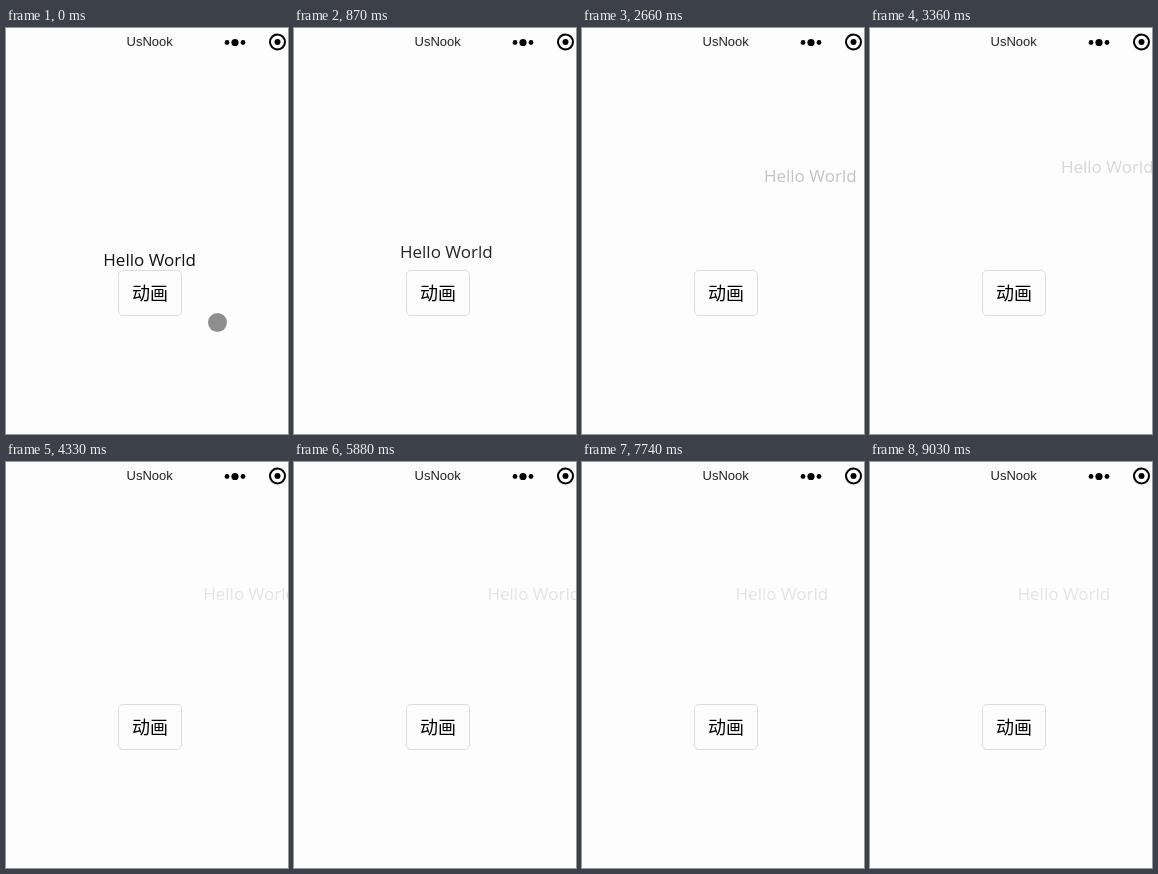
These frames come from a looping animation (282 px wide and 406 px high, 9130 ms). An HTML page:

```html
<!DOCTYPE html>
<html lang="zh-CN">
<head>
<meta charset="utf-8">
<title>Animation demo</title>
<style>
  html, body { margin: 0; width: 100%; height: 100%; overflow: hidden; background: #fdfdfd; }
  svg { display: block; width: 282px; height: 406px; }
  .title { font: 13px "Liberation Sans", Arial, sans-serif; fill: #222; }
  .label { font: 300 18px "Noto Sans CJK SC", "Noto Sans CJK", sans-serif; }
  .hello { font: 17px "Open Sans", "Noto Sans", sans-serif; fill: #111; }
</style>
</head>
<body>
<svg viewBox="0 0 282 406">
  <rect width="282" height="406" fill="#fdfdfd"/>
  <text class="title" x="143.7" y="18" text-anchor="middle">UsNook</text>
  <circle cx="221" cy="14.5" r="2.4"/>
  <circle cx="229" cy="14.5" r="3.6"/>
  <circle cx="237" cy="14.5" r="2.4"/>
  <circle cx="271.5" cy="14" r="7.5" fill="none" stroke="#000" stroke-width="2"/>
  <circle cx="271.5" cy="14" r="3"/>
  <rect x="112.5" y="242.5" width="63" height="45" rx="4.5" fill="#fdfdfd" stroke="#dcdcdc"/>
  <text class="label" x="144" y="272" text-anchor="middle">动画</text>
  <text class="hello" id="hello" x="97.3" y="238.3">Hello World</text>
  <circle id="touch" r="9.5" fill="#8e8e8e"/>
</svg>
<script>
const LOOP = 9130;
const DURATION = 4000;
const RISE_START = 467;
const SLIDE_START = 5400;
const FINAL_OPACITY = 0.1;

// Bursts of evenly spaced redraws: [first, last, count]
const BURSTS = [
  [560, 1560, 8], [1720, 2660, 8], [2810, 3780, 8], [3900, 4330, 4],
  [5480, 6430, 8], [6570, 7590, 9], [7740, 8760, 8], [9030, 9030, 1]
];

const hello = document.getElementById("hello");
const touch = document.getElementById("touch");

function bezier(a, b, s) {
  const r = 1 - s;
  return 3 * r * r * s * a + 3 * r * s * s * b + s * s * s;
}

// CSS "ease": cubic-bezier(.25, .1, .25, 1)
function ease(x) {
  if (x <= 0) return 0;
  if (x >= 1) return 1;
  let lo = 0, hi = 1;
  for (let i = 0; i < 24; i++) {
    const mid = (lo + hi) / 2;
    if (bezier(0.25, 0.25, mid) < x) lo = mid; else hi = mid;
  }
  return bezier(0.1, 1, lo);
}

function lastRedraw(time) {
  let result = 0;
  for (const [first, last, count] of BURSTS) {
    if (time < first) break;
    const step = (last - first) / Math.max(1, count - 1);
    result = time >= last ? last : first + Math.floor((time - first) / step) * step;
  }
  return result;
}

function draw(time) {
  const t = lastRedraw(time);
  const rise = ease((t - RISE_START) / DURATION);
  const slide = ease((t - SLIDE_START) / DURATION);
  hello.setAttribute("transform", `translate(${100 * rise - 50 * slide} ${-100 * rise})`);
  hello.setAttribute("opacity", 1 - (1 - FINAL_OPACITY) * rise);

  const [x, y] = time < 130 ? [211.5, 294.5] : [248.5, 310.5];
  touch.setAttribute("cx", x);
  touch.setAttribute("cy", y);
  touch.setAttribute("visibility", time < 280 ? "visible" : "hidden");
}

const start = performance.now();
function tick() {
  draw((performance.now() - start) % LOOP);
  requestAnimationFrame(tick);
}
tick();
</script>
</body>
</html>
```
